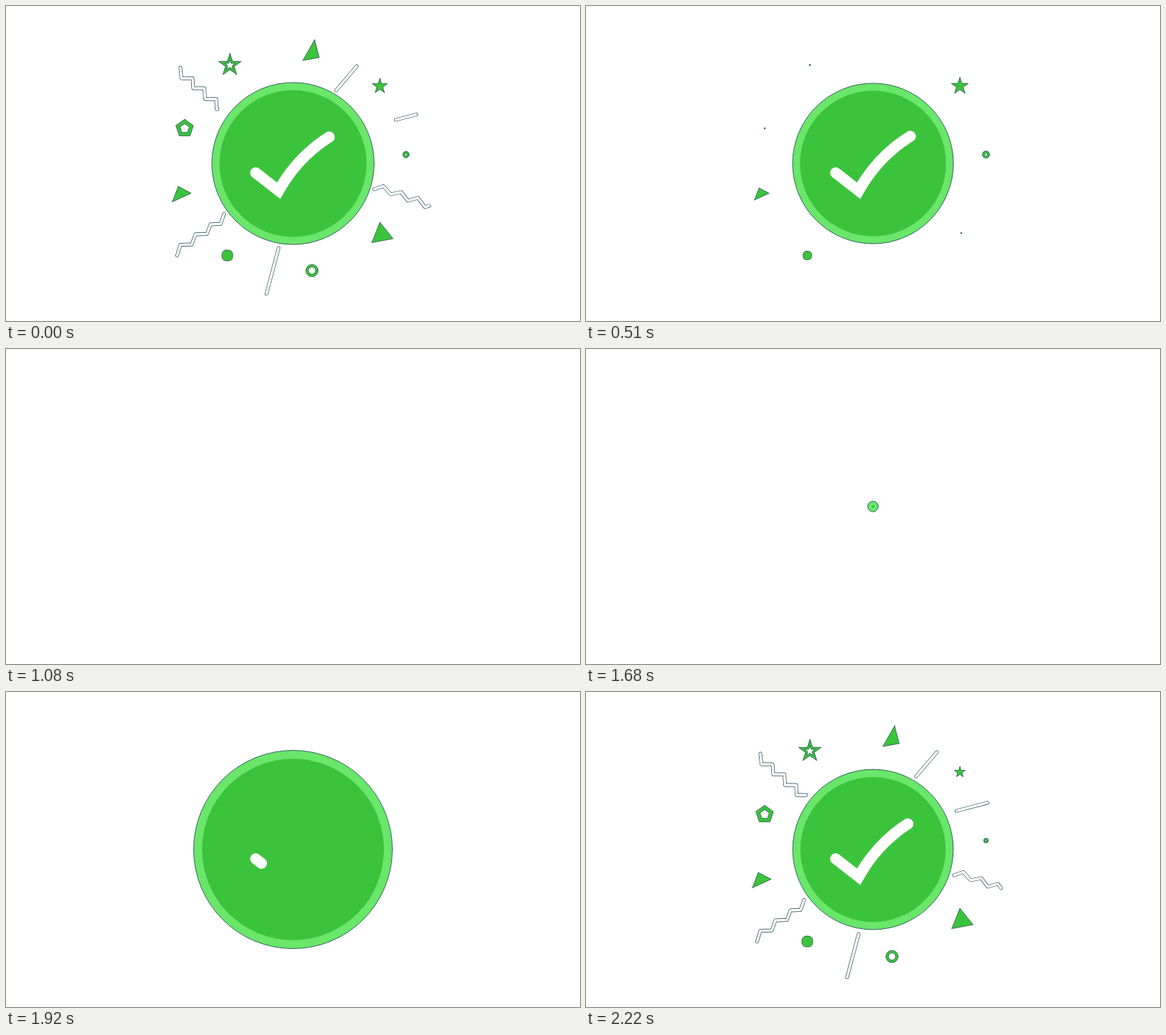
Animation, 800 px wide and 440 px high, one loop 2.25 s. Source, as an HTML page with a canvas:

```html
<!DOCTYPE html>
<html lang="en">
<head>
<meta charset="utf-8">
<title>Success check</title>
<style>
  html, body { margin: 0; width: 100%; height: 100%; overflow: hidden; background: #fff; }
  canvas { display: block; width: 800px; height: 440px; }
</style>
</head>
<body>
<canvas id="stage"></canvas>
<script>
const LOOP = 2250, STEP = 30, ENTER_AT = 1680;
const GREEN = '#3cc33c', RIM = '#6ae66a', EDGE = '#123f4a', WHITE = '#fff';

const canvas = document.getElementById('stage');
const ctx = canvas.getContext('2d');
const ratio = window.devicePixelRatio || 1;
canvas.width = 800 * ratio;
canvas.height = 440 * ratio;

const clamp = x => Math.min(1, Math.max(0, x));
const smooth = x => { x = clamp(x); return x * x * (3 - 2 * x); };
const ramp = (t, start, length) => smooth((t - start) / length);

// Fast cubic-bezier style ease, solved by bisection.
function bezierEase(x, x1, y1, x2, y2) {
  const at = (s, a, b) => 3 * (1 - s) ** 2 * s * a + 3 * (1 - s) * s * s * b + s ** 3;
  let lo = 0, hi = 1;
  x = clamp(x);
  for (let i = 0; i < 20; i++) {
    const mid = (lo + hi) / 2;
    if (at(mid, x1, x2) < x) lo = mid; else hi = mid;
  }
  return at(hi, y1, y2);
}

// Linear growth that rings around its final size.
function pop(t, start) {
  const grow = 152, x = t - start;
  if (x <= 0) return 0;
  if (x < grow) return x / grow;
  const ring = (x - grow) / 1000;
  return 1 + 0.47 * Math.sin(5 * Math.PI * ring) * Math.exp(-7 * ring);
}

function polygon(n, radius, inner) {
  const count = inner ? n * 2 : n;
  return Array.from({ length: count }, (_, i) => {
    const a = i / count * 2 * Math.PI - Math.PI / 2;
    const r = inner && i % 2 ? inner : radius;
    return [r * Math.cos(a), r * Math.sin(a)];
  });
}

function shapePath(points) {
  const path = new Path2D();
  points.forEach(([x, y]) => path.lineTo(x, y));
  path.closePath();
  return path;
}

function disc(r) {
  const path = new Path2D();
  path.arc(0, 0, r, 0, 2 * Math.PI);
  return path;
}

function roundedSquare(size, r) {
  const path = new Path2D();
  path.roundRect(-size / 2, -size / 2, size, size, r);
  return path;
}

const early = [262, 915], second = [300, 954], third = [390, 1035], last = [450, 1085];
const shapes = [
  { x: 427, y: 64, time: early, body: shapePath([[3, -17], [9.5, 8], [-13, 12]]) },
  { x: 426.5, y: 369.5, time: early, body: disc(8.6), hole: disc(5) },
  { x: 312, y: 82.5, time: second, body: shapePath(polygon(5, 16.5, 6.4)), hole: shapePath(polygon(5, 7.6, 3.1)) },
  { x: 249, y: 171, time: second, body: shapePath(polygon(5, 12.8)), hole: shapePath(polygon(5, 6.8)) },
  { x: 523, y: 317, time: second, body: shapePath([[-2, -15], [16.5, 8], [-13, 13.5]]) },
  { x: 245, y: 262, time: third, body: shapePath([[-5, -10], [13, -0.5], [-13, 11.5]]) },
  { x: 308.5, y: 348.5, time: third, body: roundedSquare(15, 5.8) },
  { x: 521, y: 112, time: last, body: shapePath(polygon(5, 12.4, 4.8)) },
  { x: 557.5, y: 207.5, time: last, body: disc(5), hole: disc(2) }
];

// Each streak grows from its first point, then leaves in the same direction.
const streak = (points, start, length, exit) => ({
  points,
  head: t => ramp(t, start, length),
  tail: t => ramp(t, exit, 220)
});

const streaks = [
  streak([[309, 144], [293.5, 144], [293, 130], [277.5, 130], [276.5, 115], [261, 115], [260, 101], [244.5, 101], [243, 86]], 243, 220, 523),
  streak([[460, 118], [489, 84]], 247, 220, 575),
  streak([[304, 290.5], [299, 304.5], [285, 305], [280, 318.5], [264, 319], [259, 333], [243, 333.5], [238.5, 348.5]], 282, 220, 585),
  streak([[513, 256], [526, 251.5], [536, 263], [551, 260], [560, 272], [574, 268], [584, 281], [597, 276.5]], 390, 215, 680),
  streak([[380, 338], [363, 402]], 385, 180, 660),
  {
    points: [[507, 168.5], [572, 151.5]],
    head: t => Math.min(1, 0.66 * ramp(t, 245, 140) + ramp(t, 516, 100)),
    tail: t => ramp(t, 516, 100)
  }
];

const check = [[348, 233]];
for (let i = 0; i <= 24; i++) {
  const u = i / 24, v = 1 - u;
  check.push([
    v * v * 380 + 2 * u * v * 407 + u * u * 452,
    v * v * 258 + 2 * u * v * 210 + u * u * 182
  ]);
}

// Part of a polyline between two fractions of its length.
function trim(points, from, to) {
  const lengths = points.slice(1).map(([x, y], i) => Math.hypot(x - points[i][0], y - points[i][1]));
  const total = lengths.reduce((sum, n) => sum + n, 0);
  const path = new Path2D();
  let done = 0;
  lengths.forEach((length, i) => {
    const a = Math.max(0, (from * total - done) / length);
    const b = Math.min(1, (to * total - done) / length);
    if (b > a) {
      const [x0, y0] = points[i], [x1, y1] = points[i + 1];
      const at = u => [x0 + (x1 - x0) * u, y0 + (y1 - y0) * u];
      path.lineTo(...at(a));
      path.lineTo(...at(b));
    }
    done += length;
  });
  return path;
}

function strokePath(path, color, width, join) {
  ctx.lineCap = 'round';
  ctx.lineJoin = join;
  ctx.strokeStyle = color;
  ctx.lineWidth = width;
  ctx.stroke(path);
}

function drawStreak({ points, head, tail }, t) {
  const from = tail(t), to = head(t);
  if (to - from < 0.001) return;
  const path = trim(points, from, to);
  strokePath(path, EDGE, 4.8, 'round');
  strokePath(path, WHITE, 3.5, 'round');
}

function drawShape({ x, y, time, body, hole }, t) {
  const scale = ramp(t, time[0], 150) * (1 - ramp(t, time[1], 150));
  if (scale < 0.01) return;
  ctx.save();
  ctx.translate(x, y);
  ctx.scale(scale, scale);
  [[body, GREEN], [hole, WHITE]].forEach(([path, color]) => {
    if (!path) return;
    ctx.fillStyle = color;
    ctx.fill(path);
    strokePath(path, EDGE, 0.7 / scale, 'miter');
  });
  ctx.restore();
}

function drawBadge(t) {
  const leave = 1 - clamp((t - 1490) / 160) ** 2;
  const outer = 112 * pop(t, -10) * leave;
  const inner = 101.7 * pop(t, -3) * leave;
  if (outer < 0.1) return;
  ctx.save();
  ctx.translate(400, 220);
  const rim = disc(outer);
  ctx.fillStyle = RIM;
  ctx.fill(rim);
  strokePath(rim, EDGE, 0.8, 'round');
  ctx.fillStyle = GREEN;
  ctx.fill(disc(inner));
  ctx.restore();

  const from = ramp(t, 1320, 300);
  const to = bezierEase((t - 195) / 440, 0.25, 0, 0.2, 1);
  if (to - from > 0.001) strokePath(trim(check, from, to), WHITE, 15.5, 'miter');
}

const origin = performance.now();

function draw() {
  const elapsed = Math.max(0, performance.now() - origin) % LOOP;
  const t = (Math.floor(elapsed / STEP) * STEP - ENTER_AT + LOOP) % LOOP;
  ctx.setTransform(ratio, 0, 0, ratio, 0, 0);
  ctx.fillStyle = WHITE;
  ctx.fillRect(0, 0, 800, 440);
  streaks.forEach(s => drawStreak(s, t));
  shapes.forEach(s => drawShape(s, t));
  // The pause between leaving and entering shows an empty stage.
  if (t < 1650) drawBadge(t);
  requestAnimationFrame(draw);
}
draw();
</script>
</body>
</html>
```
